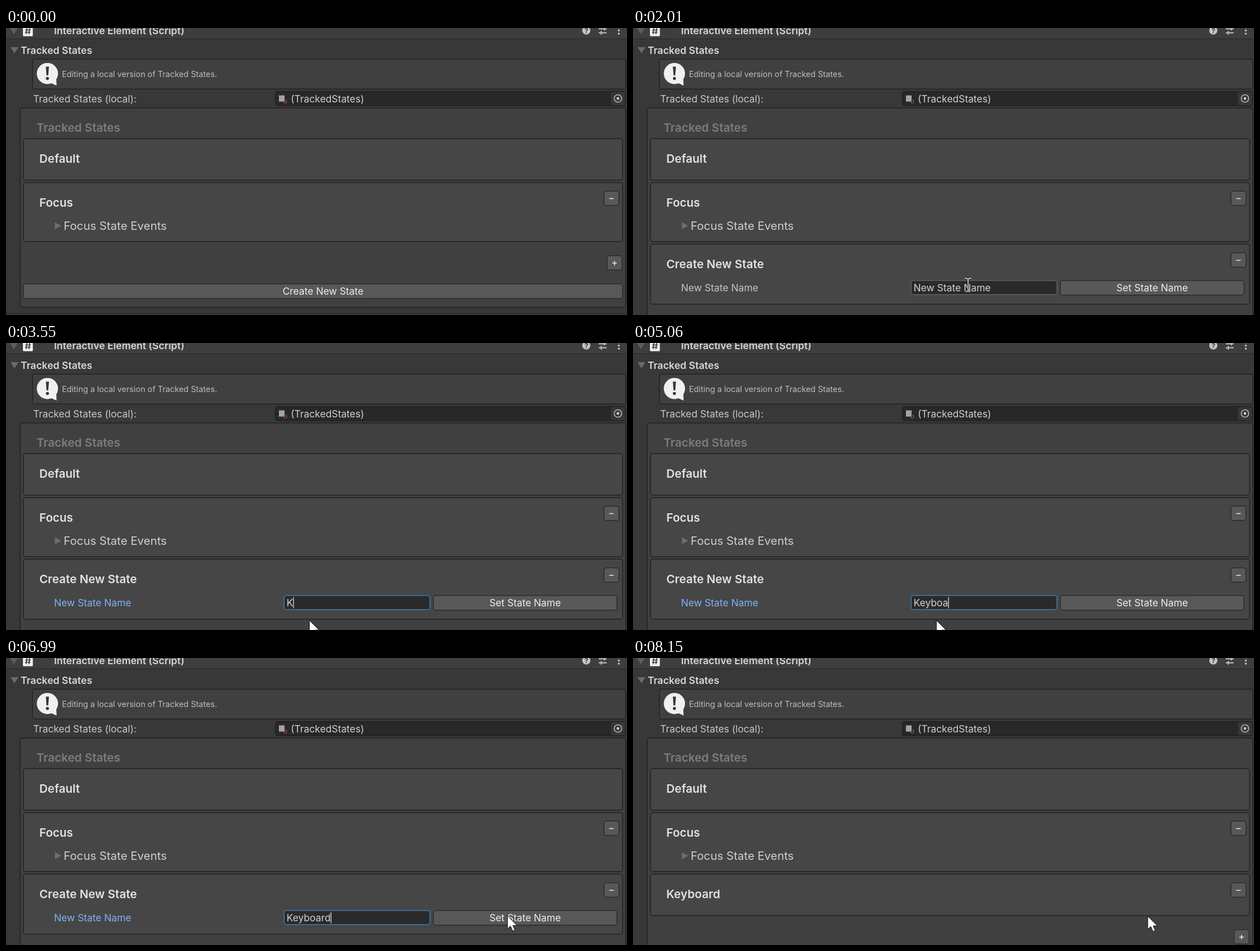
These frames come from a looping animation (1099x509 px, 10000 ms). An HTML page:

```html
<!DOCTYPE html>
<html lang="en">
<head>
<meta charset="utf-8">
<title>Create New State</title>
<style>
  html, body { margin: 0; width: 100%; height: 100%; overflow: hidden; background: #383838; }
  svg { display: block; width: 1099px; height: 509px; }
  text { font-family: Inter, sans-serif; white-space: pre; }
</style>
</head>
<body>
<svg id="stage" viewBox="0 0 1099 509"></svg>
<script>
const NS = 'http://www.w3.org/2000/svg';
const LOOP = 10000;
const stage = document.getElementById('stage');

function add(parent, tag, attrs, content) {
  const el = document.createElementNS(NS, tag);
  for (const k in attrs) el.setAttribute(k, attrs[k]);
  if (content) el.textContent = content;
  parent.appendChild(el);
  return el;
}
const group = (parent = stage) => add(parent, 'g', {});
const path = (g, d, attrs) => add(g, 'path', { d, fill: 'none', ...attrs });
const circle = (g, cx, cy, r, attrs) => add(g, 'circle', { cx, cy, r, ...attrs });

// Bordered box given by its outer edges
function box(g, x1, y1, x2, y2, fill, stroke = '#222', rx = 4) {
  return add(g, 'rect', {
    x: x1 + .75, y: y1 + .75, width: x2 - x1 - 1.5, height: y2 - y1 - 1.5,
    rx, fill, stroke, 'stroke-width': 1.5
  });
}
function label(g, x, y, size, content, fill = '#d0d0d0', weight = 400, attrs = {}) {
  return add(g, 'text', { x, y, fill, 'font-size': size, 'font-weight': weight, ...attrs }, content);
}
const title = (g, y, content) => label(g, 59, y, 20.5, content, '#e2e2e2', 600);
const panel = (g, y1, y2) => box(g, 30, y1, 1092, y2, '#464646');

function button(g, x1, y1, x2, y2, content) {
  const r = box(g, x1, y1, x2, y2, '#585858', '#2b2b2b');
  if (content) label(g, (x1 + x2) / 2, (y1 + y2) / 2 + 6.5, 17.3, content, '#eee', 400, { 'text-anchor': 'middle' });
  return r;
}
function signButton(g, x, y, plus) {
  button(g, x, y, x + 28, y + 27);
  const cx = x + 14, cy = y + 14;
  path(g, `M${cx - 4} ${cy}h8` + (plus ? `M${cx} ${cy - 4}v8` : ''), { stroke: '#e8e8e8', 'stroke-width': 1.5 });
}

// Component header
add(stage, 'rect', { width: 1099, height: 509, fill: '#383838' });
add(stage, 'rect', { width: 1099, height: 19, fill: '#3e3e3e' });
add(stage, 'rect', { y: 18.5, width: 1099, height: 1.5, fill: '#2c2c2c' });
path(stage, 'M7 0H21L14 11Z', { fill: '#5e5e5e' });
add(stage, 'rect', { x: 30, y: -6, width: 17.5, height: 20.5, rx: 1.5, fill: '#f2f2f2' });
path(stage, 'M37 0L35.5 11M42 0L40.5 11M34 3.5H44M33.5 7.5H43.5', { stroke: '#2c3a33', 'stroke-width': 1.6 });
label(stage, 85, 11, 17.5, 'Interactive Element (Script)', '#d6d6d6', 600);
circle(stage, 1027, 4.5, 7.2, { fill: '#c4c4c4' });
label(stage, 1027, 9, 12, '?', '#3e3e3e', 700, { 'text-anchor': 'middle' });
path(stage, 'M1049 1.5H1063M1049 8.5H1063M1059 -2V4.5M1053.5 5V12', { stroke: '#c4c4c4', 'stroke-width': 1.8 });
[-1, 4.5, 10].forEach(y => circle(stage, 1084.5, y, 1.8, { fill: '#c4c4c4' }));

// Foldout heading and notice
path(stage, 'M8 34H22L15 45Z', { fill: '#6a6a6a' });
label(stage, 26, 45.5, 17.5, 'Tracked States', '#d8d8d8', 600);
box(stage, 46, 54.5, 1097.5, 109, '#404040');
path(stage, 'M78 97L89.5 102L89 90Z', { fill: '#f0f0f0' });
circle(stage, 73.3, 80.7, 18.8, { fill: '#f0f0f0' });
path(stage, 'M70.5 68.5H76L74.8 84H71.7Z', { fill: '#383838' });
circle(stage, 73.3, 89.5, 2.7, { fill: '#383838' });
label(stage, 99, 87, 14.3, 'Editing a local version of Tracked States.', '#bdbdbd');

// Object field
label(stage, 48, 132, 17.3, 'Tracked States (local):', '#c8c8c8');
box(stage, 476, 112, 1097, 138.5, '#282828', '#202020');
add(stage, 'rect', { x: 1070.5, y: 113.5, width: 25, height: 23.5, rx: 3, fill: '#373737' });
circle(stage, 1083, 125, 6.6, { fill: 'none', stroke: '#c8c8c8', 'stroke-width': 1.4 });
circle(stage, 1083, 125, 2.4, { fill: '#c8c8c8' });
add(stage, 'rect', { x: 483, y: 119.5, width: 10, height: 11, fill: '#a4a4a4' });
label(stage, 490.5, 132.5, 8, '{}', '#d8663c', 600);
label(stage, 504, 132, 17.3, '(TrackedStates)', '#d0d0d0');

// State list
const frame = box(stage, 24.5, 141, 1097.5, 496, '#404040');
label(stage, 54, 184, 20.5, 'Tracked States', '#7c7c7c', 600);
panel(stage, 195.5, 270.5);
title(stage, 239, 'Default');
panel(stage, 273.5, 379.5);
title(stage, 316.5, 'Focus');
signButton(stage, 1057.5, 288.5);
path(stage, 'M86.5 344.5V357L97.5 350.75Z', { fill: '#6e6e6e' });
label(stage, 102, 358, 20.3, 'Focus State Events', '#cfcfcf');

const idle = group();
signButton(idle, 1063, 403, true);
const createButton = button(idle, 30, 453, 1092, 480.5, 'Create New State');
add(idle, 'rect', { y: 505, width: 1099, height: 1.5, fill: '#2a2a2a' });

const form = group();
panel(form, 382.5, 490.5);
title(form, 426, 'Create New State');
signButton(form, 1057.5, 398);
const nameLabel = label(form, 85, 467, 17.3, 'New State Name', '#c4c4c4');
const field = box(form, 491.5, 447, 751, 473.5, '#2a2a2a');
const selection = add(form, 'rect', { x: 496, y: 450, width: 138, height: 21, fill: '#3662a0' });
const entry = label(form, 496.5, 467, 17.3, '', '#d2d2d2');
const caret = add(form, 'rect', { y: 450.5, width: 1.3, height: 20, fill: '#d8d8d8' });
const setButton = button(form, 755.5, 447, 1082, 474.5, 'Set State Name');

const done = group();
panel(done, 382.5, 457.5);
title(done, 426, 'Keyboard');
signButton(done, 1057.5, 398);
signButton(done, 1063, 481, true);

// Pointer
const spot = circle(stage, 0, 0, 17, { fill: '#d2cf1c', 'fill-opacity': .85 });
const arrow = path(stage, 'M0 0V23L5.4 18.3L9.3 27L13.2 25.3L9.5 17H17Z', { fill: '#fff', stroke: '#111', 'stroke-width': 1 });
const beam = group();
const beamShape = 'M-6 -12H-2L0 -10.5L2 -12H6M0 -10.5V10.5M-4 11.5H-2L0 10L2 11.5H4';
path(beam, beamShape, { stroke: '#222', 'stroke-width': 3 });
path(beam, beamShape, { stroke: '#e4e4e4', 'stroke-width': 1.5 });

// Each move: start, number of poses, end, shape, way points [progress, x, y]
const moves = [
  [150, 11, 920, arrow, [[0, 481, 500], [.55, 489, 447], [1, 504, 463]]],
  [1240, 1, 1240, beam, [[0, 506, 465]]],
  [1700, 5, 2010, beam, [[0, 514, 463], [.75, 586, 455], [1, 593, 456]]],
  [2620, 1, 2620, arrow, [[0, 566, 480]]],
  [2700, 1, 2700, arrow, [[0, 537, 492]]],
  [6450, 12, 7290, arrow, [[0, 497, 486], [.15, 496, 485], [.8, 961, 452], [1, 921, 458]]],
  [8070, 2, 8150, arrow, [[0, 915, 458], [1, 911, 458]]]
];
const clicks = [[1160, 1240, 504, 463, 17], [2240, 2310, 593, 459.5, 22], [7540, 7770, 921.5, 458, 17]];
const typing = [3550, 3720, 4270, 4750, 4810, 5060, 5130, 5740];

function along(points, p) {
  const i = Math.max(1, points.findIndex(q => q[0] >= p));
  const b = points[i], a = points[i - 1];
  if (!b) return points[0].slice(1);
  const u = (p - a[0]) / (b[0] - a[0]);
  const e = u * u * (3 - 2 * u);
  return [a[1] + (b[1] - a[1]) * e, a[2] + (b[2] - a[2]) * e];
}
const show = (el, on) => el.setAttribute('visibility', on ? 'visible' : 'hidden');

function drawPointer(t) {
  const move = moves.filter(m => t >= m[0]).pop();
  show(arrow, move && move[3] === arrow);
  show(beam, move && move[3] === beam);
  if (move) {
    const [start, count, end, shape, points] = move;
    const gap = (end - start) / (count - 1) || 1;
    const step = Math.min(count - 1, Math.floor((t - start) / gap + 1e-6));
    const [x, y] = along(points, count > 1 ? step / (count - 1) : 0);
    shape.setAttribute('transform', `translate(${x} ${y})`);
  }
  const click = clicks.find(c => t >= c[0] && t < c[1]);
  show(spot, click);
  if (click) ['cx', 'cy', 'r'].forEach((k, i) => spot.setAttribute(k, click[i + 2]));
}

function draw(t) {
  const phase = t < 1240 ? idle : t < 7770 ? form : done;
  [idle, form, done].forEach(g => g.setAttribute('display', g === phase ? 'inline' : 'none'));
  frame.setAttribute('height', phase === idle ? 353.5 : 400);
  createButton.setAttribute('fill', t >= 1090 ? '#676767' : '#585858');
  setButton.setAttribute('fill', t >= 7540 ? '#6e6e6e' : '#585858');
  setButton.setAttribute('stroke', t >= 7540 ? '#1c1c1c' : '#2b2b2b');

  if (phase === form) {
    const focused = t >= 2240;
    const typed = typing.filter(k => t >= k).length;
    nameLabel.setAttribute('fill', focused ? '#7fb0f8' : '#c4c4c4');
    field.setAttribute('stroke', focused ? '#3a79bb' : '#606060');
    entry.textContent = typed ? 'Keyboard'.slice(0, typed) : 'New State Name';
    selection.setAttribute('display', focused && !typed ? 'inline' : 'none');
    caret.setAttribute('display', typed ? 'inline' : 'none');
    if (typed) caret.setAttribute('x', 496.5 + entry.getComputedTextLength());
  }
  drawPointer(t);
}

const start = performance.now();
function tick() {
  draw((performance.now() - start) % LOOP);
  requestAnimationFrame(tick);
}
tick();
</script>
</body>
</html>
```
